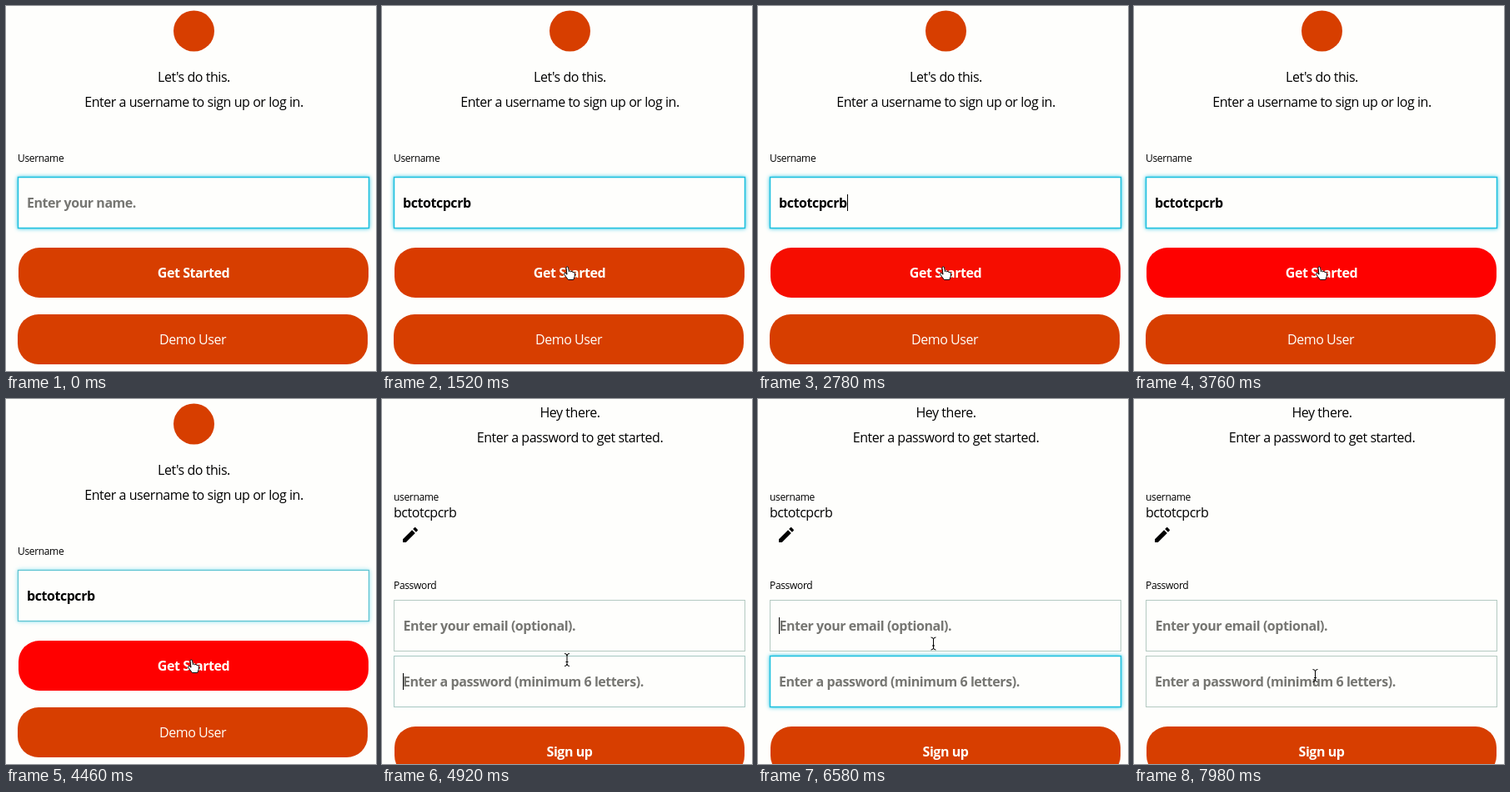
An HTML page with a canvas that plays this animation: 444 by 438 pixels, repeating every 8000 ms.

```html
<!DOCTYPE html>
<html lang="en">
<head>
<meta charset="utf-8">
<title>Sign up form</title>
<style>
html, body { margin: 0; width: 100%; height: 100%; overflow: hidden; background: #fefefc; }
canvas { display: block; width: 444px; height: 438px; }
</style>
</head>
<body>
<canvas id="stage"></canvas>
<script>
const W = 444, H = 438, LOOP = 8000;
const BG = '#fefefc', ORANGE = [215, 62, 0], RED = [255, 0, 0];
const IDLE = [180, 202, 194], FOCUS = [30, 192, 222];
const HINT = '#767672', CREAM = '#fffff8';
const NAME = 'bctotcpcrb';

// Key times in ms
const HOVER = 1330, BLUR = 4200, PAGE2 = 4840, CLICK = 6580;

const canvas = document.getElementById('stage');
const ctx = canvas.getContext('2d');
const dpr = window.devicePixelRatio || 1;
canvas.width = W * dpr;
canvas.height = H * dpr;

const pencil = new Path2D('M3 17.25V21h3.75L17.81 9.94l-3.75-3.75L3 17.25z' +
  'M20.71 7.04c.39-.39.39-1.02 0-1.41l-2.34-2.34c-.39-.39-1.02-.39-1.41 0l-1.83 1.83 3.75 3.75 1.83-1.83z');
const hand = new Path2D('M-1 1.2C-1-.6 1.4-.6 1.6 1.2L2.3 5.6C2.8 4.5 4.4 4.7 4.6 6' +
  'C5.3 5 6.8 5.3 7 6.7C8 5.9 9.4 6.6 9.4 8L9.2 11.5L7.8 15.5H1.5L-1.6 11.6L-3.4 8.8' +
  'C-3.8 7.4-2.2 6.9-1.2 8L0 9.2Z');
const arrow = new Path2D('M0 0V14L3.2 11L5.4 16L7.6 15L5.4 10.2H10Z');

const clamp = x => Math.max(0, Math.min(1, x));
const mix = (a, b, k) => a.map((v, i) => v + (b[i] - v) * k);
const rgb = c => `rgb(${c.map(Math.round).join(',')})`;
const smooth = x => x * x * (3 - 2 * x);

// CSS "ease" timing curve
function ease(x) {
  if (x <= 0) return 0;
  if (x >= 1) return 1;
  let lo = 0, hi = 1;
  for (let i = 0; i < 20; i++) {
    const u = (lo + hi) / 2, v = 1 - u;
    if (0.75 * u * v * v + 0.75 * u * u * v + u ** 3 < x) lo = u; else hi = u;
  }
  const u = lo, v = 1 - u;
  return 0.3 * u * v * v + 3 * u * u * v + u ** 3;
}
const span = (t, start, length) => ease((t - start) / length);

function text(str, x, y, { size = 16, bold = false, color = '#000', align = 'left' } = {}) {
  ctx.font = `${bold ? 700 : 400} ${size}px "Open Sans", "Noto Sans", sans-serif`;
  ctx.letterSpacing = `${-0.028 * size}px`;
  ctx.fillStyle = color;
  ctx.textAlign = align;
  ctx.fillText(str, x, y);
  return ctx.measureText(str).width;
}

function button(x, y, label, color, bold) {
  ctx.fillStyle = rgb(color);
  ctx.beginPath();
  ctx.roundRect(x, y, 420, 60, 25);
  ctx.fill();
  text(label, x + 210, y + 36, { bold, color: CREAM, align: 'center' });
}

function field(y, glow) {
  ctx.save();
  ctx.fillStyle = BG;
  if (glow > 0) {
    ctx.shadowColor = `rgba(30,195,228,${glow})`;
    ctx.shadowBlur = 5 * dpr;
  }
  ctx.fillRect(14, y, 422, 62);
  ctx.restore();
  ctx.strokeStyle = rgb(mix(IDLE, FOCUS, glow));
  ctx.lineWidth = 1 + 0.5 * glow;
  ctx.strokeRect(14.5, y + 0.5, 421, 61);
}

function caret(x, y) {
  ctx.fillStyle = '#000';
  ctx.fillRect(Math.round(x), y, 1, 20);
}

function beam(x, y) {
  ctx.strokeStyle = '#000';
  ctx.lineWidth = 1;
  ctx.beginPath();
  for (const s of [-1, 1]) {
    ctx.moveTo(x - 3, y + 7.5 * s);
    ctx.quadraticCurveTo(x, y + 7.5 * s, x, y + 5 * s);
    ctx.quadraticCurveTo(x, y + 7.5 * s, x + 3, y + 7.5 * s);
  }
  ctx.moveTo(x, y - 6);
  ctx.lineTo(x, y + 6);
  ctx.moveTo(x - 1.5, y + 2.5);
  ctx.lineTo(x + 1.5, y + 2.5);
  ctx.stroke();
}

function shape(path, x, y, fill, outline) {
  ctx.save();
  ctx.translate(x, y);
  ctx.fillStyle = fill;
  ctx.fill(path);
  if (outline) {
    ctx.strokeStyle = outline;
    ctx.lineWidth = 1;
    ctx.stroke(path);
  }
  ctx.restore();
}

function typed(t) {
  if (t < 20) return 0;
  if (t < 120) return 2;
  if (t < 700) return 3;
  return Math.min(NAME.length, 4 + Math.floor((t - 700) / 70));
}

// Pointer position; null while hidden by typing
function pointer(t) {
  if (t < 260 || (t >= 700 && t < 1280)) return null;
  const path = [
    [1280, 1500, 231, 238, 222, 313],
    [5440, 5600, 221.5, 313, 211, 295],
    [5860, 5880, 211, 295, 210.5, 293.5],
    [7000, 7500, 210.5, 293.5, 217.5, 332]
  ];
  let pos = [231.5, 238];
  for (const [a, b, x0, y0, x1, y1] of path) {
    if (t >= a) pos = mix([x0, y0], [x1, y1], smooth(clamp((t - a) / (b - a))));
  }
  return pos;
}

function loginPage(t) {
  ctx.fillStyle = rgb(ORANGE);
  ctx.beginPath();
  ctx.arc(225.5, 30, 24.5, 0, Math.PI * 2);
  ctx.fill();

  text("Let's do this.", 225.5, 91, { align: 'center' });
  text('Enter a username to sign up or log in.', 225.5, 121, { align: 'center' });
  text('Username', 14, 187, { size: 12 });

  field(205, 1 - span(t, BLUR, 1000));
  const count = typed(t);
  if (count) {
    const w = text(NAME.slice(0, count), 25, 242, { bold: true });
    const on = t < 1280 || (t < BLUR && Math.floor((t - 1280) / 500) % 2 === 1);
    if (on) caret(25 + w, 226);
  } else {
    text('Enter your name.', 25, 242, { bold: true, color: HINT });
  }

  button(15, 290, 'Get Started', mix(ORANGE, RED, span(t, HOVER, 3000)), true);
  button(14, 370, 'Demo User', ORANGE, false);
}

function passwordPage(t) {
  text('Hey there.', 225.5, 22, { align: 'center' });
  text('Enter a password to get started.', 225.5, 52, { align: 'center' });
  text('username', 14, 122, { size: 12 });
  text(NAME, 14, 142);
  shape(pencil, 22, 151, '#000');
  text('Password', 14, 228, { size: 12 });

  field(241, 0);
  field(308, t < CLICK ? span(t, PAGE2, 1000) : 1 - span(t, CLICK, 1000));
  text('Enter your email (optional).', 25.5, 278, { bold: true, color: HINT });
  text('Enter a password (minimum 6 letters).', 25, 345, { bold: true, color: HINT });

  if (t < CLICK) {
    if (t < 5040 || (t >= 5540 && t < 6040)) caret(25, 329);
  } else if (t < 6980 || (t >= 7480 && t < 7980)) {
    caret(25, 262);
  }
  button(15, 393, 'Sign up', ORANGE, true);
}

function draw(t) {
  ctx.setTransform(dpr, 0, 0, dpr, 0, 0);
  ctx.fillStyle = BG;
  ctx.fillRect(0, 0, W, H);
  const first = t < PAGE2;
  if (first) loginPage(t); else passwordPage(t);

  const pos = pointer(t);
  if (!pos) return;
  const [x, y] = pos;
  if (!first || y < 267) beam(x, y);
  else if (y < 290) shape(arrow, x, y, '#000', '#fff');
  else shape(hand, x, y, '#fff', '#000');
}

const start = performance.now();
function tick() {
  draw((performance.now() - start) % LOOP);
  requestAnimationFrame(tick);
}
tick();
</script>
</body>
</html>
```
